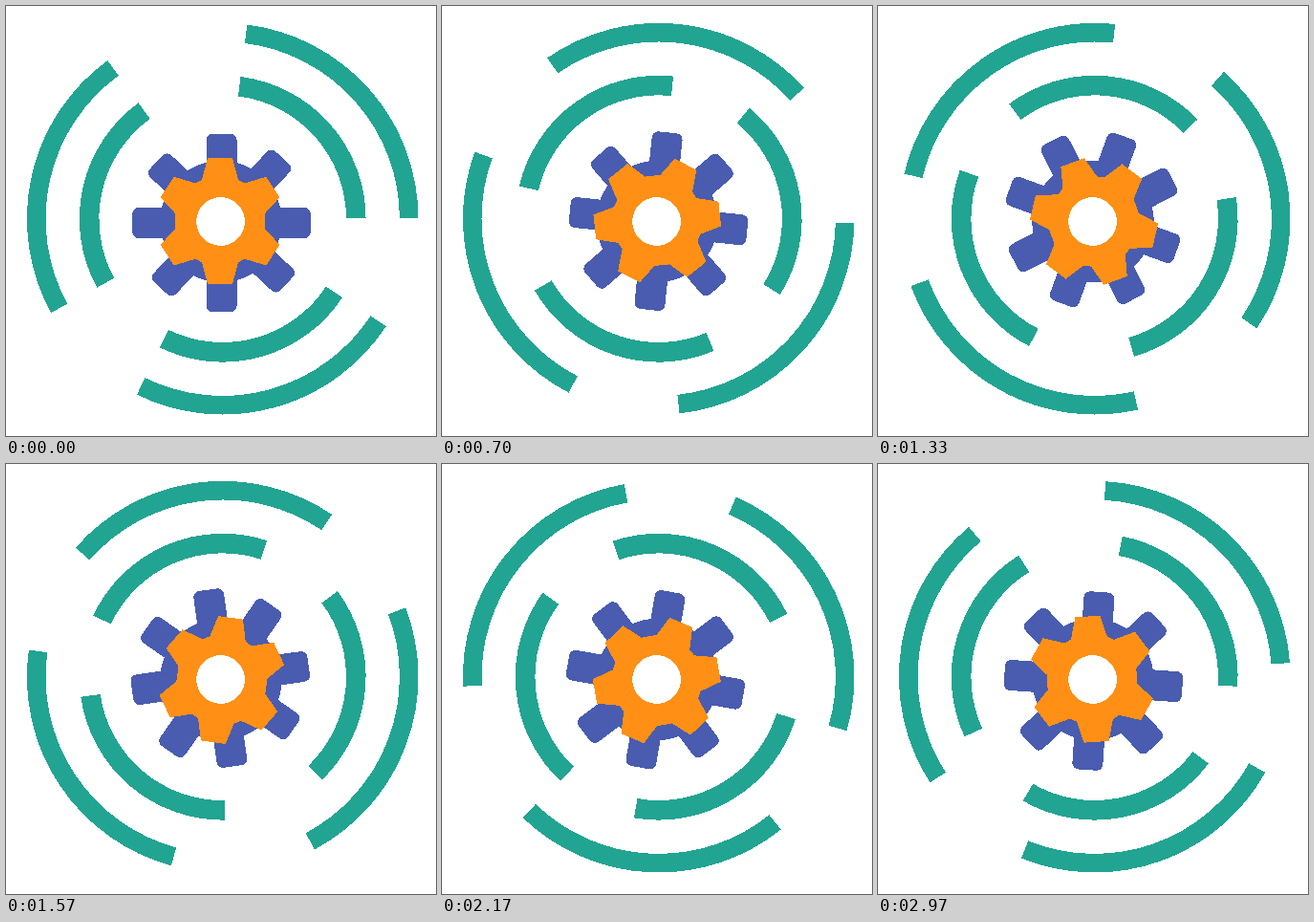
Write an HTML page that moves like this. It is 450 by 450 pixels and loops after 3 s.

```html
<!DOCTYPE html>
<html lang="en">
<head>
<meta charset="utf-8">
<title>Turning gears</title>
<style>
  html, body { margin: 0; width: 100%; height: 100%; overflow: hidden; background: #fff; }
  svg { display: block; width: 100vw; height: 100vh; }
</style>
</head>
<body>
<svg viewBox="0 0 450 450" shape-rendering="crispEdges">
  <g fill="none" stroke="#22a492">
    <path id="outerRing" stroke-width="19.6"/>
    <path id="innerRing" stroke-width="20.6"/>
  </g>
  <g id="backGear" fill="#495cb0"></g>
  <polygon id="frontGear" fill="#ff9015"/>
  <circle cx="224.6" cy="225.5" r="25.4" fill="#fff"/>
</svg>
<script>
const LOOP = 3000;
const STEPS_PER_LOOP = 90;
const RING_CENTER = [226.7, 222.7];
const GEAR_CENTER = [225, 225.5];
const ARC_STARTS = [33.3, 151.3, 277.2];
const ARC_SPAN = 82.7;

const byId = id => document.getElementById(id);

function polar(radius, degrees) {
  const a = degrees * Math.PI / 180;
  return [radius * Math.cos(a), radius * Math.sin(a)].map(v => v.toFixed(3)).join(' ');
}

function ringPath(radius) {
  return ARC_STARTS.map(start =>
    `M${polar(radius, start)}A${radius} ${radius} 0 0 1 ${polar(radius, start + ARC_SPAN)}`
  ).join('');
}

// Eight teeth, the diagonal ones turned back slightly and all set a little off the axle.
function backGearMarkup() {
  let teeth = '';
  for (let i = 0; i < 8; i++) {
    const angle = i * 45 - (i % 2) * 2;
    teeth += `<rect x="40" y="-16" width="93.3" height="32" rx="6.5" transform="rotate(${angle})"/>`
      .replace('93.3', '53.3');
  }
  return `<circle r="63.7"/><g transform="translate(.5 1.5)">${teeth}</g>`;
}

// One quarter of the outline, mirrored into the other three.
function frontGearPoints() {
  const quarter = [[13, 65.8], [19, 43.3], [25.8, 39.6], [48.3, 46.4], [62.4, 24.8], [47, 8]];
  const mirror = (points, sx, sy) => points.map(([x, y]) => [x * sx - 1, y * sy - 0.4]);
  const back = [...quarter].reverse();
  return [
    ...mirror(quarter, 1, -1), ...mirror(back, 1, 1),
    ...mirror(quarter, -1, 1), ...mirror(back, -1, -1)
  ].join(' ');
}

byId('outerRing').setAttribute('d', ringPath(195));
byId('innerRing').setAttribute('d', ringPath(139.6));
byId('backGear').innerHTML = backGearMarkup();
byId('frontGear').setAttribute('points', frontGearPoints());

function turn(id, center, degrees) {
  byId(id).setAttribute('transform', `translate(${center}) rotate(${degrees})`);
}

// Thirty steps a second, each starting on the nearest 10 ms: 0, 30, 70, 100...
function stepAt(ms) {
  return Math.floor((Math.floor(ms / 10) * 10 + 4) * STEPS_PER_LOOP / LOOP);
}

function draw(ms) {
  const angle = stepAt(ms % LOOP) * 360 / STEPS_PER_LOOP;
  turn('outerRing', RING_CENTER, angle);
  turn('innerRing', RING_CENTER, -angle);
  turn('backGear', GEAR_CENTER, -angle);
  turn('frontGear', GEAR_CENTER, angle);
}

const begin = performance.now();
function tick() {
  draw(performance.now() - begin);
  requestAnimationFrame(tick);
}
tick();
</script>
</body>
</html>
```
